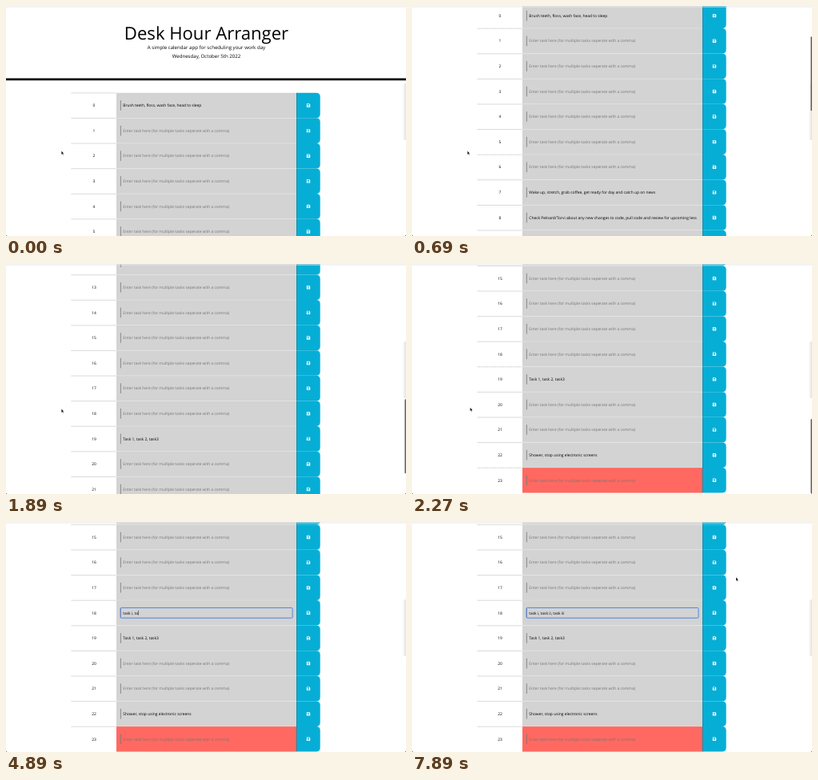
These frames come from a looping animation (500 by 288 pixels, 8000 ms). An HTML page:

```html
<!DOCTYPE html>
<html lang="en">
<head>
<meta charset="utf-8">
<title>Hourly planner</title>
<style>
  html, body { margin: 0; width: 100%; height: 100%; overflow: hidden; background: #fff; }
  svg { display: block; width: 500px; height: 288px; }
  text {
    font-family: "Open Sans", "Noto Sans", sans-serif;
    font-size: 4.9px;
    text-rendering: geometricPrecision;
    white-space: pre;
  }
  .mid { text-anchor: middle; }
  .lead { font-size: 6.12px; }
  .hint { fill: #757575; }
</style>
</head>
<body>
<svg id="stage" viewBox="0 0 500 288">
  <defs>
    <linearGradient id="fade">
      <stop offset="0" stop-color="#f6f6f6"/>
      <stop offset="1" stop-color="#e4e4e4"/>
    </linearGradient>
  </defs>
  <g id="page">
    <text class="mid" x="250.5" y="42" style="font-size:22.1px">Desk Hour Arranger</text>
    <text class="mid lead" x="250.5" y="54">A simple calendar app for scheduling your work day</text>
    <text class="mid lead" x="250.5" y="65.2">Wednesday, October 5th 2022</text>
    <rect y="90.5" width="500" height="2.7"/>
  </g>
  <rect y=".5" width="500" height="1" fill="#e8e8e8"/>
  <path d="M500 97h-1.5q-2 0-2 2v67q0 2 2 2h1.5z" fill="url(#fade)"/>
  <rect id="thumb" x="498.4" width="1.6" height="93" rx=".8" fill="#666"/>
  <path d="M0 286.5Q.2 287.8 1.5 288H0zM500 286.5Q499.8 287.8 498.5 288H500z" fill="#333"/>
  <path id="mouse" d="M0 0V4.4L1.1 3.5 1.8 5.1 2.5 4.8 1.8 3.2H3.1z" stroke="#fff" stroke-width=".25"/>
</svg>
<script>
const LOOP = 8000, FIRST_ROW = 108.7, PITCH = 31.6, EDITED = 18, PRESENT = 23;
const SCROLL_START = 98, SCROLL_STOP = 2268, SCROLL_END = 579.5;
const FOCUS = 3290, TYPE_START = 3480, CARET_END = 7690, POINTER_BACK = 7890;
const HINT = "Enter task here (for multiple tasks seperate with a comma)";
const ENTRY = "task i, task ii, task iii";
const TASKS = {
  0: "Brush teeth, floss, wash face, head to sleep",
  7: "Wake up, stretch, grab coffee, get ready for day and catch up on news",
  8: "Check Pelnard/Torvi about any new changes to code, pull code and review for upcoming less",
  12: "Lunch",
  19: "Task 1, task 2, task3",
  22: "Shower, stop using electronic screens"
};

const byId = id => document.getElementById(id);
const page = byId("page"), thumb = byId("thumb"), mouse = byId("mouse");

const clamp01 = p => Math.min(1, Math.max(0, p));
const lerp = (a, b, p) => a + (b - a) * p;
const smooth = p => p * p * (3 - 2 * p);
const progress = (time, from, to) => clamp01((time - from) / (to - from));
const snap = (time, start, step) => start + Math.floor((time - start) / step) * step;

function add(tag, attrs, content = "") {
  const node = document.createElementNS("http://www.w3.org/2000/svg", tag);
  for (const key in attrs) node.setAttribute(key, attrs[key]);
  node.textContent = content;
  return page.appendChild(node);
}

function show(node, visible) {
  node.style.display = visible ? "" : "none";
}

function addRow(hour) {
  const top = FIRST_ROW + hour * PITCH, middle = top + PITCH / 2;
  const bottom = top + PITCH, base = middle + 1.7;
  add("path", { d: `M82 ${top + .2}H138`, stroke: "#555", "stroke-width": .4, "stroke-dasharray": "1.1 .9" });
  add("text", { class: "mid", x: 110, y: base }, hour);
  add("rect", { x: 138, y: top, width: 225, height: PITCH, fill: hour === PRESENT ? "#ff6961" : "#d3d3d3" });
  add("path", { d: `M363 ${top}h24.7q5 0 5 5V${bottom - 5}q0 5 -5 5H363z`, fill: "#06aed5" });
  add("path", { d: `M138 ${top}H363`, stroke: "#fff", "stroke-width": .4, opacity: .5 });
  add("path", { d: `M363.2 ${top}V${bottom}`, stroke: "#000", "stroke-width": .4, opacity: .7 });
  add("path", {
    d: `M375.8 ${middle - 2.2}h3.4l1 1v3.4h-4.4zM376.5 ${middle - 1.5}v1.1h2.5v-1.1z`
      + `M377.2 ${middle + .8}a.8 .8 0 1 0 1.6 0a.8 .8 0 1 0 -1.6 0z`,
    fill: "#fff", "fill-rule": "evenodd"
  });
  add("path", { d: `M143.4 ${middle - 6.3}v12.6`, stroke: "#777", "stroke-width": .8 });
  const task = TASKS[hour];
  return add("text", { class: task ? "" : "hint", x: 146.3, y: base }, task || HINT);
}

const labels = Array.from({ length: 24 }, (_, hour) => addRow(hour));
const entry = labels[EDITED];
const entryMiddle = FIRST_ROW + (EDITED + .5) * PITCH;
add("rect", {
  id: "outline", x: 143.1, y: entryMiddle - 6.4, width: 215, height: 12.8, rx: 1.2,
  fill: "none", stroke: "#4f86dc", "stroke-width": 1
});
add("rect", { id: "caret", y: entryMiddle - 3, width: .5, height: 6 });
const outline = byId("outline"), caret = byId("caret");

// Sine swing that overshoots the page end by a pixel, then settles
function scrollAt(time) {
  if (time < SCROLL_START) return 0;
  if (time >= SCROLL_STOP + 190) return SCROLL_END;
  const swing = 605 * (1 - Math.cos(Math.PI * progress(time, -54, 2569))) / 2;
  return Math.min(SCROLL_END + 1, swing);
}

function pointerAt(time) {
  if (time >= POINTER_BACK) return [405, 69.3];
  if (time >= TYPE_START) return null;
  const p = smooth(progress(time, 2180, 3090));
  return [lerp(69.3, 196, p), lerp(181.6, 114, p)];
}

// Steady typing that slows down for the last numeral
function typedAt(time) {
  if (time < TYPE_START) return "";
  const count = 1 + 21 * progress(time, TYPE_START, 6480) + 3 * progress(time, 6480, 7280);
  return ENTRY.slice(0, Math.floor(count));
}

function render(time) {
  const moment = snap(time, SCROLL_START, 197.3);
  const scroll = scrollAt(moment), spot = time < POINTER_BACK ? pointerAt(moment) : pointerAt(time);
  const typed = typedAt(snap(time, TYPE_START, 200));

  page.setAttribute("transform", `translate(0 ${-scroll})`);
  thumb.setAttribute("y", 1 + scroll * .3325);
  show(thumb, time >= SCROLL_START && time < 3090);

  entry.textContent = typed || HINT;
  entry.setAttribute("class", typed ? "" : "hint");
  show(outline, time >= FOCUS);
  caret.setAttribute("x", 146.4 + (typed ? entry.getComputedTextLength() : 0));
  show(caret, time >= FOCUS && time < CARET_END);

  show(mouse, spot && !typed || time >= POINTER_BACK);
  if (spot) mouse.setAttribute("transform", `translate(${spot})`);
}

const start = performance.now();
function tick() {
  render((performance.now() - start) % LOOP);
  requestAnimationFrame(tick);
}
tick();
</script>
</body>
</html>
```
